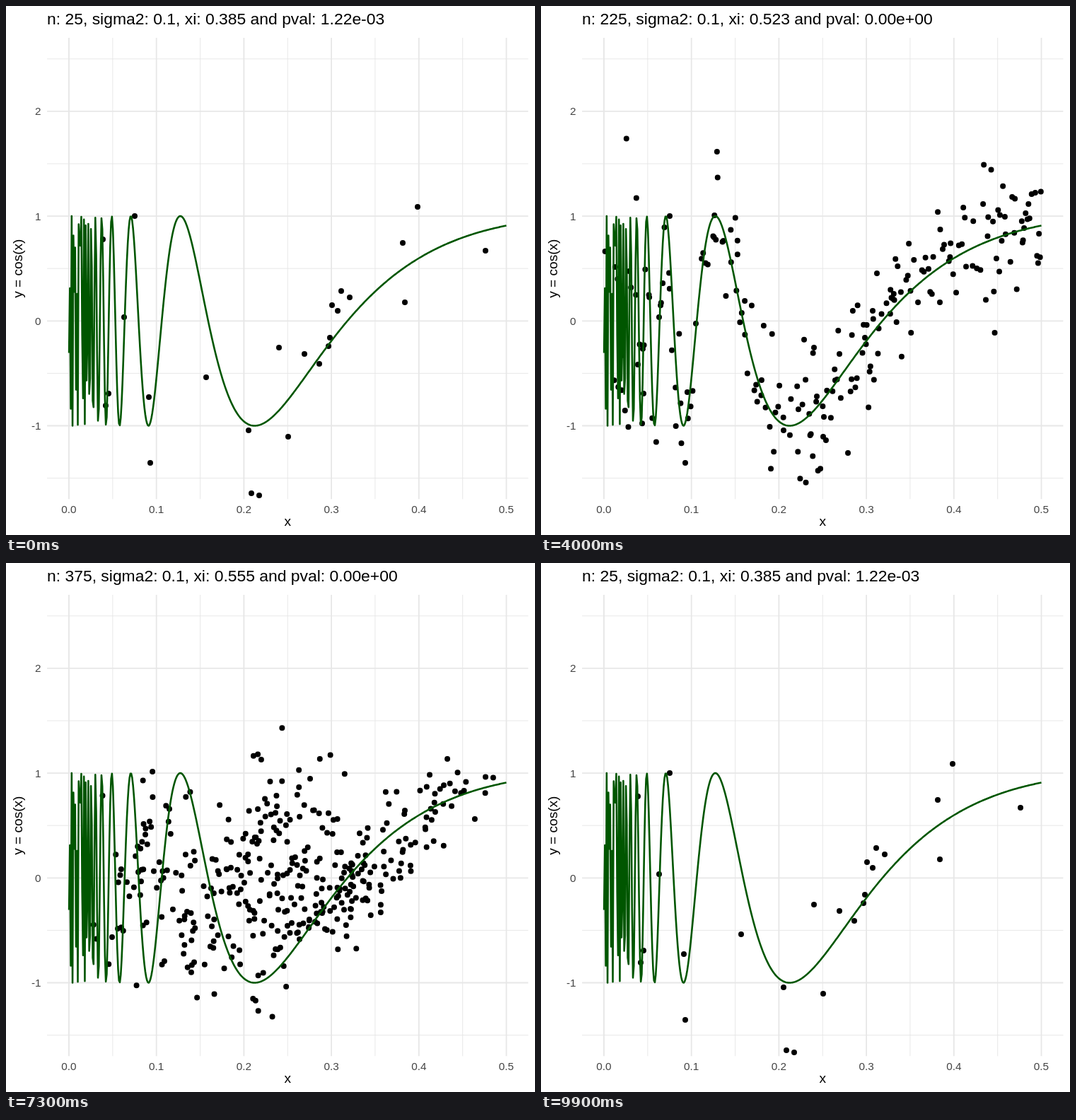
These frames come from a looping animation (748x748 px, 10000 ms). An HTML page:

```html
<!DOCTYPE html>
<html lang="en">
<head>
<meta charset="utf-8">
<title>Noisy curve, growing sample</title>
<style>
  html, body { margin: 0; width: 100%; height: 100%; overflow: hidden; background: #fff; }
  svg { display: block; width: 748px; height: 748px; }
  text { font-family: "Liberation Sans", Arial, Helvetica, sans-serif; }
  #major { stroke: #e7e7e7; stroke-width: 1.85; }
  #minor { stroke: #e7e7e7; stroke-width: .93; }
  #dots { fill: none; stroke: #000; stroke-width: 8; stroke-linecap: round; }
  #curve { fill: none; stroke: #005600; stroke-width: 2.6; stroke-linejoin: round; }
  #ticks { fill: #444; font-size: 15.3px; }
  .label { font-size: 19.1px; text-anchor: middle; }
  #title { font-size: 22.9px; }
</style>
</head>
<body>
<svg viewBox="0 0 748 748">
  <clipPath id="panel"><rect x="58.1" y="45.1" width="680.3" height="652.1"/></clipPath>
  <g clip-path="url(#panel)">
    <path id="minor"/>
    <path id="major"/>
    <path id="dots"/>
    <path id="curve"/>
  </g>
  <g id="ticks"></g>
  <text class="label" x="398.3" y="735">x</text>
  <text class="label" transform="translate(23 371.2) rotate(-90)">y = cos(x)</text>
  <text id="title" x="58" y="26"></text>
</svg>
<script>
const STATES = 20, STEP = 25, POOL = STATES * STEP, VARIANCE = .1;

const $ = id => document.getElementById(id);
const px = x => 89 + 1237 * x;
const py = y => 445.3 - 148.2 * y;
const f = x => Math.sin(1 / x);
const range = (n, fn) => Array.from({ length: n }, (_, i) => fn(i));

// Grid and tick labels
const vline = x => `M${px(x)} 45V698`;
const hline = y => `M58 ${py(y)}H739`;
const xs = range(6, i => i / 10), ys = range(4, i => i - 1);
$('major').setAttribute('d', [...xs.map(vline), ...ys.map(hline)].join(''));
$('minor').setAttribute('d', [
  ...range(5, i => vline(i / 10 + .05)),
  ...range(5, i => hline(i - 1.5))
].join(''));

function tick(x, y, anchor, label) {
  const t = document.createElementNS('http://www.w3.org/2000/svg', 'text');
  t.setAttribute('x', x);
  t.setAttribute('y', y);
  t.setAttribute('text-anchor', anchor);
  t.textContent = label;
  $('ticks').append(t);
}
xs.forEach(x => tick(px(x), 717.3, 'middle', x.toFixed(1)));
ys.forEach(y => tick(49.5, py(y) + 5.5, 'end', y));

// 500 evenly spaced samples; the coarse steps make the left end jagged
$('curve').setAttribute('d', 'M' + range(500, i => {
  const x = 1e-4 + i * .4999 / 499;
  return px(x).toFixed(2) + ' ' + py(f(x)).toFixed(2);
}).join('L'));

function rng(seed) {
  return () => {
    seed = seed + 0x6D2B79F5 | 0;
    let t = Math.imul(seed ^ seed >>> 15, 1 | seed);
    t = t + Math.imul(t ^ t >>> 7, 61 | t) ^ t;
    return ((t ^ t >>> 14) >>> 0) / 4294967296;
  };
}
function shuffle(list, rand) {
  const out = list.slice();
  for (let i = out.length - 1; i > 0; i--) {
    const j = Math.floor(rand() * (i + 1));
    [out[i], out[j]] = [out[j], out[i]];
  }
  return out;
}

// Key points: the smallest sample
const first = [
  [137, 330], [141, 565], [145, 548], [167, 440], [182, 297],
  [202, 553], [204, 646], [283, 525], [343, 600], [347, 689],
  [358, 692], [386, 483], [399, 609], [422, 492], [443, 506],
  [456, 481], [458, 469], [461, 423], [469, 431], [474, 403],
  [486, 412], [561, 335], [564, 419], [582, 284], [678, 346]
];

// All other observations: uniform x, normal noise around the curve
const rand = rng(7);
const gauss = () =>
  Math.sqrt(-2 * Math.log(1 - rand())) * Math.cos(2 * Math.PI * rand());
const rest = POOL - first.length;
const pool = first.concat(range(rest, i => {
  const x = .5 * (i + 1 - rand()) / rest;
  return [px(x), py(f(x) + Math.sqrt(VARIANCE) * gauss())];
}));

const samples = range(STATES, k =>
  k ? shuffle(pool, rng(100 + k)).slice(0, STEP * (k + 1)) : first);

// Halfway to the next sample; points without a partner stay put
function between(a, b) {
  return a.map((p, i) => b[i] ? [(p[0] + b[i][0]) / 2, (p[1] + b[i][1]) / 2] : p);
}

// Rank correlation xi, linear between a few sample sizes
const xiKeys = [[25, .3847], [125, .468], [225, .523], [275, .516],
                [375, .555], [425, .552], [500, .559]];
function xiAt(n) {
  const i = Math.max(1, xiKeys.findIndex(key => key[0] >= n));
  const [n0, x0] = xiKeys[i - 1], [n1, x1] = xiKeys[i];
  return x0 + (x1 - x0) * (n - n0) / (n1 - n0);
}

// Variance of sqrt(n) * xi under independence, without ties
function xiVariance(n) {
  let a = 0, b = 0, c = 0, u = 0;
  for (let i = 1; i <= n; i++) {
    const q = i / n, w = (2 * (n - i) + 1) / n;
    a += w * q * q / n;
    b += (q * (2 * n + 1 - i) / (2 * n)) ** 2 / n;
    c += w * q / n;
    u += q * (1 - q) / n;
  }
  return (a - 2 * b + c * c) / (u * u);
}

// One-sided p-value: normal upper tail by continued fraction
function pValue(n, xi) {
  const z = xi * Math.sqrt(n / xiVariance(n));
  let d = z;
  for (let i = 80; i > 0; i--) d = z + i / d;
  const tail = Math.exp(-z * z / 2) / Math.sqrt(2 * Math.PI) / d;
  return 1 - (1 - tail);
}

const titles = range(STATES, k => {
  const n = STEP * (k + 1), xi = xiAt(n);
  const p = pValue(n, xi).toExponential(2).replace(/(?<=[+-])(?=\d$)/, '0');
  return `n: ${n}, sigma2: ${VARIANCE}, xi: ${xi.toFixed(3)} and pval: ${p}`;
});

let shown = -1;
function draw(ms) {
  const step = Math.floor(ms / 100) % 100;
  if (step === shown) return;
  shown = step;
  // Four still steps and one halfway step per state; one still step less at mid-loop
  const s = step < 50 ? step : step + 1;
  const k = Math.floor(s / 5) % STATES;
  const pts = s % 5 === 4 ? between(samples[k], samples[(k + 1) % STATES]) : samples[k];
  $('dots').setAttribute('d',
    pts.map(([x, y]) => `M${x.toFixed(2)} ${y.toFixed(2)}h0`).join(''));
  $('title').textContent = titles[k];
}

const start = performance.now();
function loop() {
  draw(performance.now() - start);
  requestAnimationFrame(loop);
}
loop();
</script>
</body>
</html>
```
